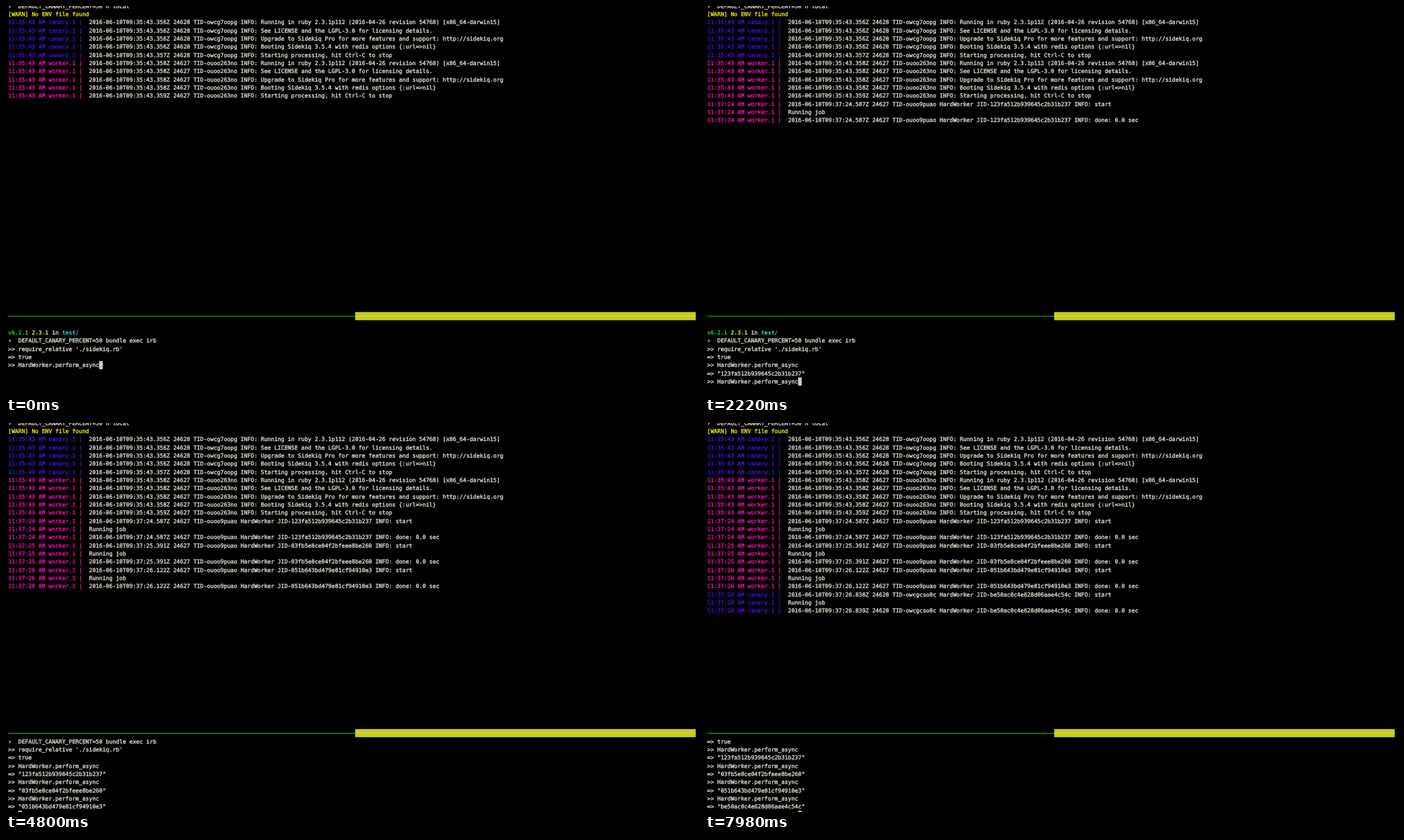
Recreate the animation shown at these times as an HTML page with a canvas. Size 960 by 540 pixels, loop 8 s.

```html
<!DOCTYPE html>
<html lang="en">
<head>
<meta charset="utf-8">
<title>Canary worker terminal</title>
<style>
html, body { margin: 0; width: 100%; height: 100%; overflow: hidden; background: #000; }
canvas { display: block; }
</style>
</head>
<body>
<canvas id="stage" width="960" height="540"></canvas>
<script>
const ctx = document.getElementById('stage').getContext('2d');
const LOOP = 8000;
const LEFT = 3, CELL = 14 / 3, ROW = 11.34, ROW_0 = -0.4;
const SIZE = 7.75;
const LAST_ROW = 48, DIVIDER_ROW = 38, FIRST_SHELL_ROW = 39;
const LOG_DELAY = 40;

const COLOR = {
  text: '#cfcfc2', warn: '#d6d620', worker: '#e60aa6', canary: '#440ccc',
  green: '#10e040', yellow: '#ecec4c', cyan: '#34e2c4',
  rule: '#0a9c1c', bar: '#c6cb1e', barRule: '#d3d766', cursor: '#cbcbb4'
};

const COMMAND = 'HardWorker.perform_async';
const PID = { canary: '24628', worker: '24627' };

// recall: command appears at the prompt; run: it is executed
const jobs = [
  { recall: 0, run: 160, who: 'worker', tid: 'ouoo9puao', clock: '37:24', ms: [587, 587], id: '123fa512b939645c2b31b237' },
  { recall: 1400, run: 2320, who: 'worker', tid: 'ouoo9puao', clock: '37:25', ms: [391, 391], id: '03fb5e8ce04f2bfeee8be260' },
  { recall: 3680, run: 4300, who: 'worker', tid: 'ouoo9puao', clock: '37:26', ms: [122, 122], id: '051b643bd479e81cf94910e3' },
  { recall: 5440, run: 6220, who: 'canary', tid: 'owcgcso0c', clock: '37:26', ms: [838, 839], id: 'be50ac0c4e628d06aae4c54c' },
  { recall: 7160, run: Infinity }
];

const rowY = row => ROW_0 + row * ROW;
const colX = col => LEFT + col * CELL;

function put(text, col, row, color, bold = false) {
  ctx.font = `${bold ? 'bold ' : ''}${SIZE}px "DejaVu Sans Mono", monospace`;
  ctx.fillStyle = ctx.strokeStyle = color;
  ctx.lineWidth = 0.42;
  ctx.lineJoin = 'round';
  const y = rowY(row) + 2.9;
  [...text].forEach((ch, i) => {
    if (ch === ' ') return;
    ctx.fillText(ch, colX(col + i), y);
    if (!bold) ctx.strokeText(ch, colX(col + i), y);
  });
}

function stamp(who, tid, clock, ms) {
  return `2016-06-10T09:${clock}.${ms}Z ${PID[who]} TID-${tid}`;
}

function bootLog(who, tid, firstMs) {
  return [
    'Running in ruby 2.3.1p112 (2016-04-26 revision 54768) [x86_64-darwin15]',
    'See LICENSE and the LGPL-3.0 for licensing details.',
    'Upgrade to Sidekiq Pro for more features and support: http://sidekiq.org',
    'Booting Sidekiq 3.5.4 with redis options {:url=>nil}',
    'Starting processing, hit Ctrl-C to stop'
  ].map((msg, i) => ({
    who, clock: '35:43',
    text: `${stamp(who, tid, '35:43', firstMs + (i === 4 ? 1 : 0))} INFO: ${msg}`
  }));
}

function jobLog({ who, tid, clock, ms, id }) {
  const line = (n, msg) => `${stamp(who, tid, clock, ms[n])} HardWorker JID-${id} INFO: ${msg}`;
  return [line(0, 'start'), 'Running job', line(1, 'done: 0.0 sec')]
    .map(text => ({ who, clock, text }));
}

const boot = [...bootLog('canary', 'owcg7oopg', 356), ...bootLog('worker', 'ouoo263no', 358)];

function drawLog(logged) {
  put('›  DEFAULT_CANARY_PERCENT=50 n local', 0, 0, COLOR.text);
  put('[WARN] No ENV file found', 0, 1, COLOR.warn);
  const lines = [...boot, ...jobs.slice(0, logged).flatMap(jobLog)];
  lines.forEach(({ who, clock, text }, i) => {
    put(`11:${clock} AM ${who}.1 |`, 0, i + 2, COLOR[who]);
    put(text, 24, i + 2, COLOR.text);
  });
}

function drawDivider() {
  const y = rowY(DIVIDER_ROW), split = colX(103), width = colX(204) + 0.5 - split;
  ctx.fillStyle = COLOR.rule;
  ctx.fillRect(LEFT, 430, split - LEFT, 1.3);
  ctx.fillStyle = COLOR.bar;
  ctx.fillRect(split, y - ROW / 2, width, ROW);
  ctx.fillStyle = COLOR.barRule;
  ctx.fillRect(split, 430, width, 1);
}

function drawPrompt(row) {
  put('v6.2.1', 0, row, COLOR.green, true);
  put('2.3.1', 7, row, COLOR.yellow, true);
  put('in', 13, row, COLOR.text);
  put('test/', 16, row, COLOR.cyan, true);
}

function drawShell(ran, recalled) {
  const lines = [
    '', null,
    '›  DEFAULT_CANARY_PERCENT=50 bundle exec irb',
    ">> require_relative './sidekiq.rb'",
    '=> true'
  ];
  jobs.slice(0, ran).forEach(job => lines.push(`>> ${COMMAND}`, `=> "${job.id}"`));
  const typed = recalled > ran ? COMMAND : '';
  lines.push(`>> ${typed}`);

  const scroll = Math.max(0, lines.length - (LAST_ROW - FIRST_SHELL_ROW + 1));
  lines.slice(scroll).forEach((text, i) => {
    const row = FIRST_SHELL_ROW + i;
    if (text === null) drawPrompt(row);
    else put(text, 0, row, COLOR.text);
  });

  const cursorRow = FIRST_SHELL_ROW + lines.length - 1 - scroll;
  ctx.fillStyle = COLOR.cursor;
  ctx.fillRect(colX(3 + typed.length), rowY(cursorRow) - ROW / 2, CELL + 0.3, ROW);
}

let shown = '';
function frame(now) {
  const t = now % LOOP;
  const ran = jobs.filter(j => t >= j.run).length;
  const logged = jobs.filter(j => t >= j.run + LOG_DELAY).length;
  const recalled = jobs.filter(j => t >= j.recall).length;
  const state = [ran, logged, recalled].join();
  if (state !== shown) {
    shown = state;
    ctx.fillStyle = '#000';
    ctx.fillRect(0, 0, 960, 540);
    drawLog(logged);
    drawDivider();
    drawShell(ran, recalled);
  }
  requestAnimationFrame(frame);
}
frame(performance.now());
</script>
</body>
</html>
```
